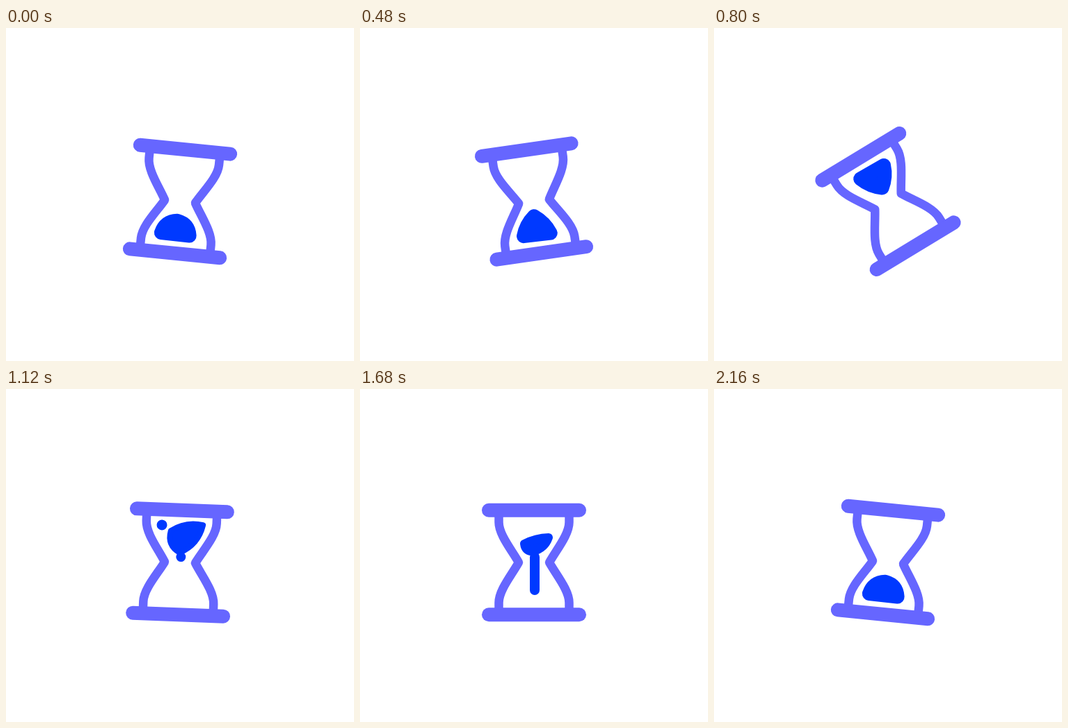
An HTML page with a canvas for the animation above (2.24 s loop, 500 by 480 pixels).

```html
<!DOCTYPE html>
<html lang="en">
<head>
<meta charset="utf-8">
<title>Hourglass</title>
<style>
html, body { margin: 0; width: 100%; height: 100%; overflow: hidden; background: #fff }
canvas { display: block }
</style>
</head>
<body>
<canvas id="stage" width="500" height="480"></canvas>
<script>
const ctx = document.getElementById('stage').getContext('2d');
const LOOP = 2240, STEP = 80;
const GLASS = '#6666ff', SAND = '#0039ff';
const FLOOR = 58, NECK = -8;

// Sand as a rounded triangle: left, right and bottom corner, radius, bulge of the top and of the sides
const heap = [-18.5, -48, 22.5, -47.5, 1, -28, 10, 0, 10];
const slump = [-17, -48.5, 22, -47.5, 3, -21, 10, 0, 5];
const splash = [-15, -45, 31, -55, -1, -14, 4, 10, 13];
const sink = [-14, -27, 21, -36, -1, -16, 6, 4, 8];
const empty = [1, -9, 1, -9, 1, -9, 3, 0, 0];
const stages = [[0, heap], [320, slump], [800, slump], [1120, splash], [1680, sink], [2000, empty]];

const progress = (t, from, to) => Math.min(1, Math.max(0, (t - from) / (to - from)));
const lerp = (a, b, u) => a + (b - a) * u;
const ease = u => u * u * (3 - 2 * u);

// Wind up, swing over, wobble, then lean into the next loop
function tilt(t) {
  if (t < 240) return 5.7 - 33.8 * Math.sin(progress(t, 0, 240) * Math.PI / 2);
  if (t < 925) return lerp(-28.1, 189, ease(progress(t, 240, 925) ** 1.6));
  if (t < 1680) return 180 + 9 * Math.exp((925 - t) / 600) * Math.cos((t - 925) / 500 * Math.PI);
  return 180 + 5.7 * ease(progress(t, 1680, 2160));
}

function shapeAt(t) {
  const i = stages.findIndex(([time]) => time > t);
  const [t0, a] = stages[i - 1], [t1, b] = stages[i];
  return a.map((v, k) => lerp(v, b[k], progress(t, t0, t1)));
}

function line(x1, y1, x2, y2, width, color) {
  ctx.lineWidth = width;
  ctx.strokeStyle = color;
  ctx.beginPath();
  ctx.moveTo(x1, y1);
  ctx.lineTo(x2, y2);
  ctx.stroke();
}

function drawShape([lx, ly, rx, ry, bx, by, radius, top, side]) {
  const bulgeTo = (x1, y1, x2, y2, bulge) => {
    const dx = x2 - x1, dy = y2 - y1, k = bulge / (Math.hypot(dx, dy) || 1);
    ctx.quadraticCurveTo((x1 + x2) / 2 + dy * k, (y1 + y2) / 2 - dx * k, x2, y2);
  };
  ctx.beginPath();
  ctx.moveTo(lx, ly);
  bulgeTo(lx, ly, rx, ry, top);
  bulgeTo(rx, ry, bx, by, side);
  bulgeTo(bx, by, lx, ly, side);
  ctx.closePath();
  ctx.lineWidth = radius * 2;
  ctx.fillStyle = ctx.strokeStyle = SAND;
  ctx.fill();
  ctx.stroke();
}

function drawGlass() {
  ctx.lineWidth = 12.5;
  ctx.strokeStyle = GLASS;
  for (const s of [-1, 1]) {
    ctx.beginPath();
    ctx.moveTo(s * 50.5, -72);
    ctx.lineTo(s * 50.5, -58);
    ctx.bezierCurveTo(s * 50.5, -40, s * 32, -18, s * 22, 0);
    ctx.bezierCurveTo(s * 32, 18, s * 50.5, 40, s * 50.5, 58);
    ctx.lineTo(s * 50.5, 72);
    ctx.stroke();
  }
  for (const y of [-75.2, 75.2]) line(-65, y, 65, y, 20, GLASS);
}

function drawSand(t) {
  if (t < 2000) drawShape(shapeAt(t));

  // Stream through the neck
  if (t >= 1120 && t < 2080) {
    const tip = Math.min(51, lerp(NECK, 40, (t - 1120) / 560));
    line(1, lerp(NECK, 50, progress(t, 1920, 2080)), 1, tip, 14, SAND);
  }

  // Stray drop
  const pop = Math.sin(progress(t, 960, 1280) * Math.PI);
  if (pop > .01) line(-28, -53, -28, -53, 15 * pop, SAND);

  // New heap growing on the floor
  if (t > 1720) {
    const u = progress(t, 1720, 2160), height = ease(u);
    ctx.translate(0, FLOOR * (1 - height));
    ctx.scale(-lerp(.25, 1, u), -height);
    drawShape(heap);
  }
}

function draw(now) {
  const t = Math.floor(now % LOOP / STEP) * STEP;
  ctx.setTransform(1, 0, 0, 1, 0, 0);
  ctx.clearRect(0, 0, 500, 480);
  ctx.translate(250, 250);
  ctx.rotate((tilt(t) - 180) * Math.PI / 180);
  ctx.lineCap = ctx.lineJoin = 'round';
  drawGlass();
  drawSand(t);
}

const start = performance.now();
function tick() {
  draw(performance.now() - start);
  requestAnimationFrame(tick);
}
tick();
</script>
</body>
</html>
```
